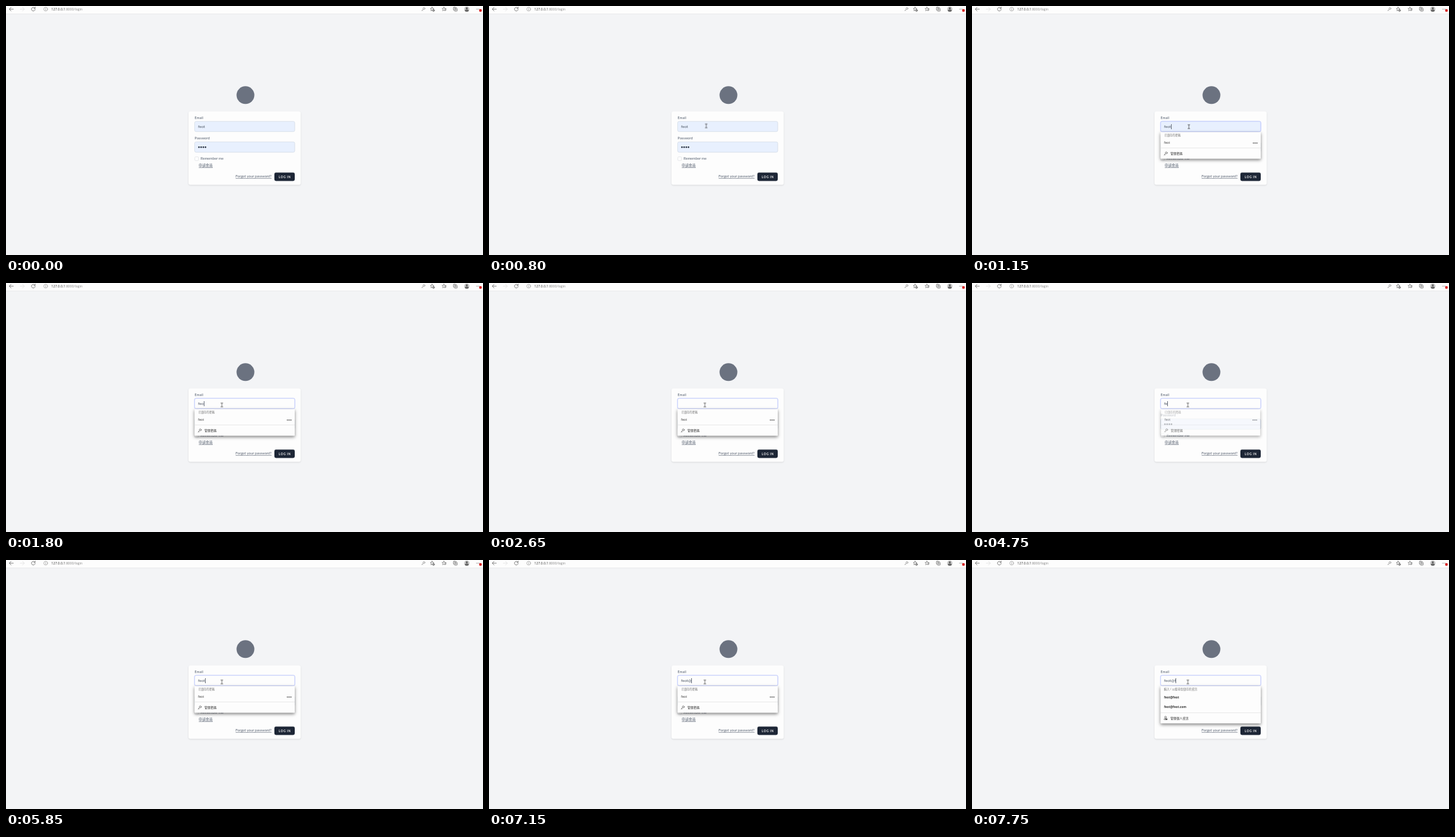
These frames come from a looping animation (750x392 px, 8000 ms). An HTML page:

```html
<!DOCTYPE html>
<html lang="zh-Hant">
<head>
<meta charset="utf-8">
<title>Login</title>
<style>
html, body { margin: 0; width: 100%; height: 100%; overflow: hidden; background: #f3f4f6; }
svg { position: absolute; left: 0; top: 0; width: 750px; height: 392px; }
text { font: 5.7px Lato, "Noto Sans CJK TC", "Noto Sans CJK", sans-serif; fill: #566070; }
.ui text, .popup text { font: 5px "Open Sans", "Noto Sans CJK TC", "Noto Sans CJK", sans-serif; fill: #333; }
.ui text { font-size: 5.2px; }
.popup .title { font-size: 4.3px; fill: #777; }
.popup .link { font-size: 4.75px; }
.popup .bold { font-size: 4.75px; font-weight: 700; }
.under { text-decoration: underline; text-decoration-thickness: .4px; }
.line { fill: none; stroke: #555; stroke-width: .7; stroke-linecap: round; stroke-linejoin: round; }
.card { fill: #fdfdfd; filter: drop-shadow(0 1.4px 1.2px rgba(0,0,0,.11)); }
.field { fill: #e8f0fe; stroke: #cbd3e0; stroke-width: .6; }
.panel { fill: #fdfdfd; filter: drop-shadow(0 2px 2.6px rgba(0,0,0,.5)); }
.rule { stroke: #dedede; stroke-width: .6; }

/* 1% = 80ms */
.step, .key, .caret { animation: 8s step-end infinite; }
#email { animation-name: email; }
#ring { animation-name: ring; }
@keyframes email {
  0% { fill: #e8f0fe; stroke: #cbd3e0; }
  13.125% { fill: #e8f0fe; stroke: #a5b4fc; }
  22.5%, 100% { fill: #fdfdfd; stroke: #a5b4fc; }
}
@keyframes ring { 0% { opacity: 0; } 13.125%, 100% { opacity: 1; } }

.popup { transform-box: fill-box; transform-origin: center; animation: 8s linear infinite; }
#saved { animation-name: saved; }
#info { animation-name: info; }
@keyframes saved {
  0%, 13.125%, 52.5%, 58.125%, 92.5%, 100% { opacity: 0; transform: scale(.97); }
  14.3%, 48.75%, 60%, 90% { opacity: 1; transform: scale(1); }
}
@keyframes info {
  0%, 94.375% { opacity: 0; transform: scale(.97); }
  96.25%, 100% { opacity: 1; transform: scale(1); }
}

#mouse { animation: mouse 8s infinite; }
#arrow { animation-name: arrow; }
#beam { animation-name: beam; }
@keyframes mouse {
  0%, 4.375% { transform: translate(425px, -12px); animation-timing-function: cubic-bezier(.3,.1,.3,1); }
  10.625%, 15.625% { transform: translate(341px, 190px); animation-timing-function: ease-in-out; }
  20.625%, 100% { transform: translate(339.4px, 192px); }
}
@keyframes arrow { 0%, 48.125% { opacity: 1; } 8.75%, 55%, 100% { opacity: 0; } }
@keyframes beam { 0%, 48.125% { opacity: 0; } 8.75%, 55%, 100% { opacity: 1; } }

.typed {
  position: absolute; left: 301.9px; top: 183px; height: 13px; display: flex; align-items: center;
  font: 6.2px Lato, sans-serif; color: #4b5563; line-height: 13px; white-space: nowrap;
}
.caret { width: 1px; height: 8px; background: #6b7280; animation-name: caret; }
@keyframes caret {
  0%, 20%, 32.5%, 54.375%, 65%, 80% { opacity: 0; }
  13.125%, 22.5%, 39.375%, 58.125%, 71.25%, 86.875%, 100% { opacity: 1; }
}
.k1 { animation-name: k1; }
.k2 { animation-name: k2; }
.k3 { animation-name: k3; }
.k4 { animation-name: k4; }
.k5 { animation-name: k5; }
.k6 { animation-name: k6; }
@keyframes k1 { 0%, 40.625%, 100% { font-size: 6.2px; } 25.625% { font-size: 0; } }
@keyframes k2 { 0%, 43.125%, 100% { font-size: 6.2px; } 25.625% { font-size: 0; } }
@keyframes k3 { 0%, 71.25%, 100% { font-size: 6.2px; } 23.75% { font-size: 0; } }
@keyframes k4 { 0%, 47.5%, 73.125%, 100% { font-size: 6.2px; } 22.5%, 58.125% { font-size: 0; } }
@keyframes k5 { 0% { font-size: 0; } 89.375%, 100% { font-size: 6.2px; } }
@keyframes k6 { 0% { font-size: 0; } 93.125%, 100% { font-size: 6.2px; } }
</style>
</head>
<body>
<svg viewBox="0 0 750 392">
  <defs>
    <g id="keyIcon" class="line">
      <circle cx="1.2" cy="-1" r="1.5"/>
      <path d="M0 .2L-2.3 2.4M-1.5 1.7l.8.8"/>
    </g>
    <path id="star" d="M0-3L.9-1 3-.8 1.4.7 1.9 2.8 0 1.7-1.9 2.8-1.4.7-3-.8-.9-1Z"/>
  </defs>

  <g class="ui">
    <rect width="750" height="12" fill="#fdfdfd"/>
    <path d="M0 12.5H750" stroke="#e9eaec"/>
    <path class="line" d="M11.5 5H5.2M8 2.2L5.2 5 8 7.8"/>
    <path class="line" d="M22.5 5H28.8M26 2.2L28.8 5 26 7.8" style="stroke:#dcdcdc"/>
    <path class="line" d="M45.6 3.7A2.9 2.9 0 1 0 45.9 5.3M45.9 1.7V3.8H43.8"/>
    <g class="line" style="stroke:#888;stroke-width:.6">
      <circle cx="62.5" cy="5" r="3"/>
      <path d="M62.5 4.8V6.5M62.5 3.4v.1"/>
    </g>
    <text x="71.3" y="6.9">127.0.0.1<tspan fill="#808080">:8000/login</tspan></text>
    <use href="#keyIcon" x="656" y="5" opacity=".7"/>
    <g class="line" style="stroke-width:.6">
      <use href="#star" x="670" y="4.8"/>
      <circle cx="672.2" cy="7" r="1.6" fill="#fdfdfd"/>
      <path d="M671.3 7h1.8M672.2 6.1v1.8"/>
      <use href="#star" x="688.6" y="4.8"/>
      <path d="M690.4 4.8h2M690.6 6.4h1.4"/>
      <rect x="703.4" y="2" width="4.6" height="4.6" rx="1"/>
      <rect x="705" y="3.6" width="4.6" height="4.6" rx="1" fill="#fdfdfd"/>
      <path d="M707.3 4.8v2.2M706.2 5.9h2.2"/>
    </g>
    <circle cx="724.5" cy="5" r="4.2" fill="#c9c9c9"/>
    <circle cx="724.5" cy="3.7" r="1.6" fill="#666"/>
    <path d="M721.4 7.7a3.1 2.2 0 0 1 6.2 0a4.2 4.2 0 0 1-6.2 0" fill="#666"/>
    <path d="M740 5h.1M742 5h.1M744 5h.1" class="line" style="stroke-width:1"/>
    <circle cx="746" cy="7" r="2.2" fill="#d92b2b"/>
  </g>

  <circle cx="376.5" cy="140.3" r="14" fill="#6b7280"/>

  <rect class="card" x="287" y="166" width="176.5" height="115.5" rx="3"/>
  <text x="296.6" y="177.7">Email</text>
  <rect class="step" id="ring" x="296.1" y="181.2" width="158.4" height="17" rx="2.6" fill="none" stroke="#dfe4fd" stroke-width=".9"/>
  <rect class="field step" id="email" x="296.6" y="181.7" width="157.4" height="16" rx="2.2"/>
  <text x="296.6" y="210">Password</text>
  <rect class="field" x="296.6" y="214" width="157.4" height="16.2" rx="2.2"/>
  <path d="M303.4 222.3h.01M306.8 222.3h.01M310.2 222.3h.01M313.6 222.3h.01" stroke="#1f2937" stroke-width="2.5" stroke-linecap="round"/>
  <rect x="296.8" y="237.4" width="6" height="6" rx="1.5" fill="#fdfdfd" stroke="#d1d5db" stroke-width=".5"/>
  <text x="306" y="242.2">Remember me</text>
  <text class="under" x="303" y="253.2" style="font-size:5.5px">申請會員</text>
  <text class="under" x="361" y="270.4">Forgot your password?</text>
  <rect x="422" y="262.2" width="32" height="13.3" rx="2.4" fill="#1d2636"/>
  <text x="428.8" y="270.5" style="font-size:4.8px;font-weight:700;letter-spacing:.55px;fill:#eee">LOG IN</text>

  <g class="popup" id="saved">
    <rect class="panel" x="296.4" y="198.6" width="157.6" height="41.9" rx=".8"/>
    <text class="title" x="302.4" y="205.1">已儲存的密碼</text>
    <text x="302" y="217.3">feot</text>
    <path d="M442.3 215.8h.01M444.3 215.8h.01M446.3 215.8h.01M448.3 215.8h.01" stroke="#333" stroke-width="1.5" stroke-linecap="round"/>
    <path class="rule" d="M296.4 223.5H454"/>
    <use href="#keyIcon" x="304.3" y="232.2"/>
    <text class="link" x="312" y="234">管理密碼</text>
  </g>

  <g class="popup" id="info">
    <rect class="panel" x="296.4" y="198.6" width="157.6" height="58.6" rx=".8"/>
    <text class="title" x="301.8" y="205.1" style="font-size:4.4px">輸入 / 以搜尋您儲存的資訊</text>
    <text class="bold" x="301.9" y="217.7">feot@feot</text>
    <text class="bold" x="301.9" y="232.7">feot@feot.com</text>
    <path class="rule" d="M296.4 240.5H454"/>
    <g class="line">
      <circle cx="304.2" cy="247.4" r="1.4"/>
      <path d="M304 251.2h-2.1c0-1.3.8-1.9 2-1.9"/>
      <rect x="304.6" y="249.8" width="2.3" height="1.7" fill="#444"/>
    </g>
    <text class="link" x="312" y="250.8">管理個人資訊</text>
  </g>

  <g id="mouse">
    <path class="step" id="arrow" d="M-.6-.8V6.6L1.1 5 2.2 7.4 3.4 6.9 2.3 4.5H4.7Z" fill="#fff" stroke="#222" stroke-width=".6"/>
    <path class="step line" id="beam" d="M-1.5-3H-.4L0-2.7 .4-3H1.5M0-2.7V2.7M-1.5 3H-.4L0 2.7 .4 3H1.5" style="stroke:#333"/>
  </g>
</svg>
<div class="typed"><span class="key k1">f</span><span class="key k2">e</span><span class="key k3">o</span><span class="key k4">t</span><span class="key k5">@</span><span class="key k6">f</span><i class="caret"></i></div>
</body>
</html>
```
